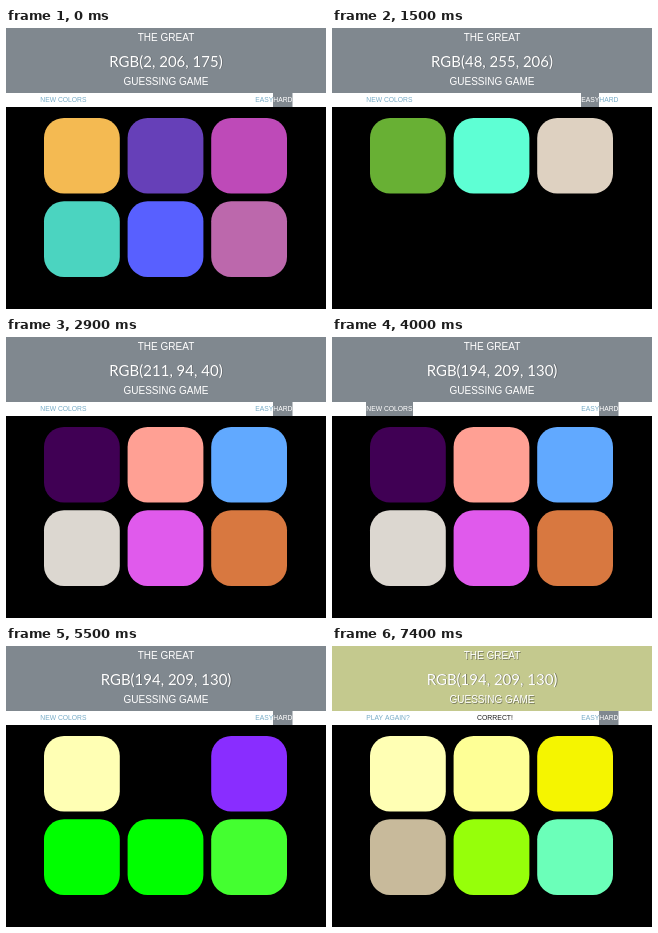
These frames come from a looping animation (320 by 281 pixels, 7.5 s). An HTML page with a canvas:

```html
<!DOCTYPE html>
<html lang="en">
<head>
<meta charset="utf-8">
<title>Colour guessing game</title>
<style>
html, body { margin: 0; width: 100%; height: 100%; overflow: hidden; background: #000; }
canvas { display: block; width: 320px; height: 281px; }
</style>
</head>
<body>
<canvas id="stage"></canvas>
<script>
const W = 320, H = 281, LOOP = 7500, STEP = 100;
const EASY_CLICK = 1100, HARD_CLICK = 2300, NEW_CLICK = 4000, WIN = 6000;
const SANS = '"Liberation Sans", Arial, sans-serif';
const ROUND = 'Lato, "Open Sans", sans-serif';
const GREY = '#80888f', KHAKI = '#c4c98e';

const canvas = document.getElementById('stage');
const ctx = canvas.getContext('2d');
const dpr = window.devicePixelRatio || 1;
canvas.width = Math.round(W * dpr);
canvas.height = Math.round(H * dpr);
ctx.scale(dpr, dpr);

const parse = hex => [0, 2, 4].map(i => parseInt(hex.slice(i, i + 2), 16));
const clamp = v => Math.max(0, Math.min(1, v));
const ramp = (t, from, to) => clamp((t - from) / (to - from));
const mix = (a, b, k) => a.map((v, i) => v + (b[i] - v) * k);
const css = rgb => `rgb(${rgb.map(Math.round).join(',')})`;

const palettes = {
  start: 'f4ba52 6640b8 be4ab8 4bd4c0 5860ff bc68ac',
  easy: '68b034 5effd4 ded1c1 dcd7d0 e05aec d87840',
  hard: '857d4c 91e2bb b5afd9 dcd7d0 e05aec d87840',
  settled: '400054 ffa094 61a9ff dcd7d0 e05aec d87840',
  fresh: 'ffffb4 4c00e0 892dff 00ff00 00ff00 44ff30',
  missed: 'ffffb4 000000 892dff 00ff00 00ff00 44ff30',
  winning: 'ffffb4 6c6c54 a058ff 00ff00 18ff00 4cff4c',
  won: 'ffffb4 feff96 f5f500 c8ba9b 96ff0a 6bffb9'
};
for (const name in palettes) palettes[name] = palettes[name].split(' ').map(parse);

const keys = [
  [0, 'start'], [EASY_CLICK, 'start'], [1500, 'easy'],
  [HARD_CLICK, 'easy'], [2500, 'hard'], [2900, 'settled'],
  [NEW_CLICK, 'settled'], [4500, 'fresh'], [5000, 'fresh'], [5500, 'missed'],
  [WIN, 'missed'], [6200, 'winning'], [6600, 'won'], [LOOP, 'won']
];

function colorsAt(t) {
  const i = keys.findIndex(key => key[0] > t);
  const [t0, from] = keys[i - 1], [t1, to] = keys[i];
  const k = ramp(t, t0, t1);
  return palettes[from].map((c, n) => mix(c, palettes[to][n], k));
}

function goalAt(t) {
  if (t < EASY_CLICK) return 'RGB(2, 206, 175)';
  if (t < HARD_CLICK) return 'RGB(48, 255, 206)';
  if (t < NEW_CLICK) return 'RGB(211, 94, 40)';
  return 'RGB(194, 209, 130)';
}

function label(text, x, y, font, color, align = 'center') {
  ctx.font = font;
  ctx.textAlign = align;
  ctx.fillStyle = color;
  ctx.fillText(text, x, y);
}

function heading(text, y, font, shade) {
  if (shade) label(text, 160.8, y + 0.8, font, `rgba(50,50,50,${shade})`);
  label(text, 160, y, font, '#fff');
}

function button(text, x, width, active) {
  if (active > 0) {
    ctx.globalAlpha = active;
    ctx.fillStyle = GREY;
    ctx.fillRect(x, 65, width, 14);
    ctx.globalAlpha = 1;
  }
  const ink = css(mix([120, 172, 199], [255, 255, 255], active));
  label(text, x + 0.3, 74.4, `6.75px ${SANS}`, ink, 'left');
}

function squares(t) {
  const count = t >= EASY_CLICK && t < HARD_CLICK ? 3 : 6;
  colorsAt(t).slice(0, count).forEach((color, i) => {
    ctx.fillStyle = css(color);
    ctx.beginPath();
    ctx.roundRect(38 + (i % 3) * 83.6, 90 + Math.floor(i / 3) * 83.3, 75.8, 75.6, 20);
    ctx.fill();
  });
}

function draw(t) {
  const won = t >= WIN;
  ctx.fillStyle = '#000';
  ctx.fillRect(0, 0, W, H);
  ctx.fillStyle = won ? KHAKI : GREY;
  ctx.fillRect(0, 0, W, 65);
  ctx.fillStyle = '#fff';
  ctx.fillRect(0, 65, W, 14);

  const small = `10px ${SANS}`;
  heading('THE GREAT', 13, small, won ? 0.5 : 0);
  heading(goalAt(t), 38.5, `15px ${ROUND}`, won ? 0.5 : 0.35);
  heading('GUESSING GAME', 57, small, won ? 0.5 : 0);

  const fresh = ramp(t, 3300, 3600) - ramp(t, 4700, 5000);
  const easy = ramp(t, 1000, 1300) - ramp(t, HARD_CLICK, 2650);
  const hard = 1 - ramp(t, EASY_CLICK, 1400) + ramp(t, 1800, 2100);
  button(won ? 'PLAY AGAIN?' : 'NEW COLORS', 34, 47, fresh);
  button('EASY', 249, 18, easy);
  button('HARD', 267, 19.5, hard);
  if (won) label('CORRECT!', 163, 74.4, `6.9px ${SANS}`, '#222');

  squares(t);
}

const begin = performance.now();
function tick() {
  const t = (performance.now() - begin) % LOOP;
  draw(Math.floor(t / STEP) * STEP);
  requestAnimationFrame(tick);
}
tick();
</script>
</body>
</html>
```
